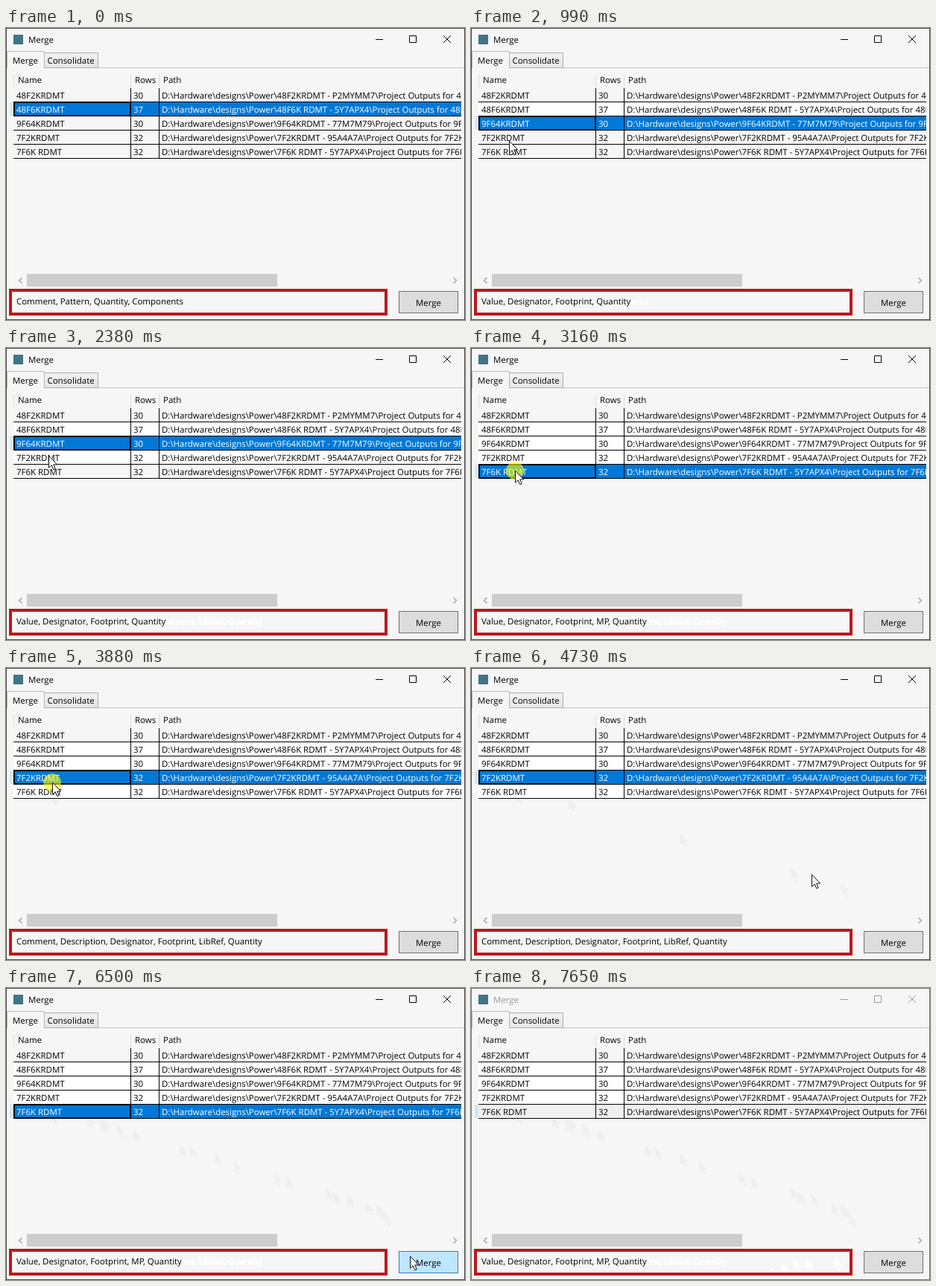
Recreate the animation shown at these times as an HTML page. Size 616 by 393 pixels, loop 7.82 s.

```html
<!DOCTYPE html>
<html lang="en">
<head>
<meta charset="utf-8">
<title>Merge</title>
<style>
  html, body { margin: 0; width: 100%; height: 100%; overflow: hidden; background: #f6f6f6; }
  svg { display: block; }
  text { font-family: "Open Sans", "Noto Sans", sans-serif; font-size: 11.45px; fill: #000; white-space: pre; text-rendering: geometricPrecision; }
  .stale { fill: #fff; stroke: #fff; stroke-width: .8; }
</style>
</head>
<body>
<svg width="616" height="393" viewBox="0 0 616 393">
  <defs>
    <path id="arrow" d="M.5 0V16.2L4.2 12.7 6.8 18.7 9.2 17.7 6.7 11.9H11.6Z"/>
    <linearGradient id="tabFill" x2="0" y2="1">
      <stop stop-color="#f2f2f2"/><stop offset="1" stop-color="#e6e6e6"/>
    </linearGradient>
    <clipPath id="gridClip"><rect width="611" height="393"/></clipPath>
    <clipPath id="blankClip"><rect x="8" y="177" width="604" height="153"/></clipPath>
    <clipPath id="footClip"><rect x="2" y="349" width="612" height="42"/></clipPath>
  </defs>

  <rect width="616" height="393" fill="#f6f6f6"/>
  <rect x="10" y="9" width="13" height="13" fill="#3f7587"/>
  <text id="title" x="30" y="20">Merge</text>
  <path id="controls" d="M496 15.5h10M541.5 10.5h9v9h-9zM587 10l10 10M597 10l-10 10" fill="none"/>

  <path d="M51 53.5H615" stroke="#c4c4c4"/>
  <rect x="51.5" y="33.5" width="72" height="20" fill="url(#tabFill)" stroke="#acacac"/>
  <path d="M1.5 54V31.5H51.5V54" fill="#f6f6f6" stroke="#b8b8b8"/>
  <text x="9" y="48">Merge</text>
  <text x="55.5" y="48">Consolidate</text>

  <path d="M10.5 62V80M167.5 62V80M205.5 62V80" stroke="#dedede"/>
  <text x="16" y="74">Name</text>
  <text x="173" y="74">Rows</text>
  <text x="211" y="74">Path</text>

  <g id="gridGhosts" fill="#efefef" clip-path="url(#blankClip)"></g>
  <g id="rows" clip-path="url(#gridClip)"></g>
  <path id="lines" stroke="#000" fill="none"/>
  <rect id="focus" x="11" width="156" height="18" fill="none" stroke="#000" stroke-width="2"/>

  <rect x="28" y="331" width="336" height="17" fill="#cdcdcd"/>
  <path d="M21.5 336l-4 3.7 4 3.7M600.5 336l4 3.7-4 3.7" fill="none" stroke="#a2a2a2" stroke-width="1.4"/>

  <text id="stale" class="stale" x="14" y="372"></text>
  <rect id="cover" x="9" y="356" height="26" fill="#f6f6f6"/>
  <g id="footGhosts" fill="#fff" clip-path="url(#footClip)"></g>
  <text id="bar" x="14" y="372"></text>
  <rect x="6" y="353" width="504" height="32" fill="none" stroke="#be171b" stroke-width="4"/>

  <rect id="button" x="527.5" y="354.5" width="79" height="29"/>
  <text x="567" y="374" text-anchor="middle">Merge</text>

  <rect id="frame" x=".5" y=".5" width="615" height="392" fill="none"/>
  <circle id="halo" r="12" fill="#ff0" opacity=".6"/>
  <use id="cursor" href="#arrow" fill="#fff" stroke="#111"/>
</svg>
<script>
const LOOP = 7820, STEP = 77, HALO = 80;
const ENTER = 70, LEAVE = 7040, AWAY = 7650;
const $ = id => document.getElementById(id);

function set(el, attrs) {
  for (const key in attrs) el.setAttribute(key, attrs[key]);
}
function add(parent, tag, attrs, text = "") {
  const el = document.createElementNS("http://www.w3.org/2000/svg", tag);
  set(el, attrs);
  el.textContent = text;
  parent.append(el);
  return el;
}
const show = (el, on) => el.setAttribute("visibility", on ? "visible" : "hidden");
const last = (list, t) => list.findLast(item => item.t <= t);
const ease = p => p * p * (3 - 2 * p);

// Table contents
const parts = "Comment, Pattern, Quantity, Components";
const data = [
  ["48F2KRDMT", 30, "48F2KRDMT - P2MYMM7", parts],
  ["48F6KRDMT", 37, "48F6K RDMT - 5Y7APX4", parts],
  ["9F64KRDMT", 30, "9F64KRDMT - 77M7M79", "Value, Designator, Footprint, Quantity"],
  ["7F2KRDMT", 32, "7F2KRDMT - 95A4A7A", "Comment, Description, Designator, Footprint, LibRef, Quantity"],
  ["7F6K RDMT", 32, "7F6K RDMT - 5Y7APX4", "Value, Designator, Footprint, MP, Quantity"]
];
const rowTop = i => 81 + 19 * i;

const rows = data.map(([name, count, folder], i) => {
  const g = add($("rows"), "g", {}), y = rowTop(i);
  const mark = add(g, "rect", { x: 5, y, width: 5, height: 18, fill: "#cfe9f9" });
  const back = add(g, "rect", { x: 10, y, width: 601, height: 18 });
  const path = `D:\\Hardware\\designs\\Power\\${folder}\\Project Outputs for ${folder}`;
  const cells = [[14, name], [171, count], [209, path]]
    .map(([x, label]) => add(g, "text", { x, y: y + 13.5 }, label));
  return { mark, back, cells };
});
$("lines").setAttribute("d",
  data.map((_, i) => `M10 ${rowTop(i) + 18.5}H611`).join("") + "M167.5 81V176M205.5 81V176");

const clicks = [
  [-HALO, 1], [530, 2], [1140, 3], [1920, 2], [2550, 3], [3160, 4], [3880, 3], [5120, 4]
].map(([t, row]) => ({ t, row, fields: data[row][3] }));

// Pointer strokes: first step, last step, where it comes to rest
const strokes = [
  [70, 380, 48, 122],
  [680, 990, 51, 152],
  [1540, 1770, 58, 126],
  [2230, 2380, 57, 145],
  [2780, 2860, 59, 165],
  [3480, 3710, 62, 154],
  [4350, 4580, 497, 290],
  [4730, 5040, 109, 171],
  [5420, 5950, 500, 293],
  [6030, 6270, 542, 361],
  [6580, 6810, 432, 363],
  [6890, 6960, 402, 376]
];
const track = [];
let [fromX, fromY] = [-2, 120];
for (const [start, end, x, y] of strokes) {
  const count = Math.round((end - start) / STEP) + 1;
  for (let k = 0; k < count; k++) {
    const p = ease((k + 1) / count);
    track.push({
      t: start + (end - start) * k / (count - 1),
      x: Math.round(fromX + (x - fromX) * p),
      y: Math.round(fromY + (y - fromY) * p)
    });
  }
  [fromX, fromY] = [x, y];
}

// Faint marks the pointer leaves on blank areas
const ghosts = track.flatMap(({ x, y }, i) => ["gridGhosts", "footGhosts"].map(layer => ({
  t: track[i + 1]?.t ?? LEAVE,
  el: add($(layer), "use", { href: "#arrow", x, y })
})));

function drawRows(t, current) {
  const away = t >= AWAY;
  rows.forEach(({ mark, back, cells }, i) => {
    const on = i === current.row;
    const seen = clicks.some(c => c.t <= t && c.row === i);
    show(mark, on);
    back.setAttribute("fill", on ? (away ? "#f0f0f0" : "#0078d7") : seen ? "#fff" : "#f6f6f6");
    cells.forEach(cell => cell.style.fill = on && !away ? "#fff" : "#000");
  });
  show($("focus"), !away);
  $("focus").setAttribute("y", rowTop(current.row));
}

// The longest earlier text stays visible in white beyond the current one
function drawBar(t, current) {
  const past = clicks.filter(c => c.t <= t).map(c => c.fields);
  $("bar").textContent = current.fields;
  $("stale").textContent = past.reduce((a, b) => b.length > a.length ? b : a);
  $("cover").setAttribute("width", $("bar").getComputedTextLength() + 6);
}

function drawPointer(t, current) {
  const inside = t >= ENTER && t < LEAVE;
  const { x, y } = last(track, t) ?? track[0];
  const hover = inside && x >= 527 && y >= 354;
  set($("cursor"), { x, y });
  set($("halo"), { cx: x, cy: y });
  show($("cursor"), inside);
  show($("halo"), inside && t < current.t + HALO);
  set($("button"), { fill: hover ? "#bee6fd" : "#ddd", stroke: hover ? "#3c7fb1" : "#707070" });
  ghosts.forEach(g => show(g.el, g.t <= t));
}

function draw(t) {
  const current = last(clicks, t), away = t >= AWAY;
  drawRows(t, current);
  drawBar(t, current);
  drawPointer(t, current);
  $("title").style.fill = away ? "#999" : "#000";
  $("controls").setAttribute("stroke", away ? "#999" : "#000");
  $("frame").setAttribute("stroke", away ? "#777" : "#484848");
}

const start = performance.now();
function tick() {
  draw((performance.now() - start) % LOOP);
  requestAnimationFrame(tick);
}
tick();
</script>
</body>
</html>
```
